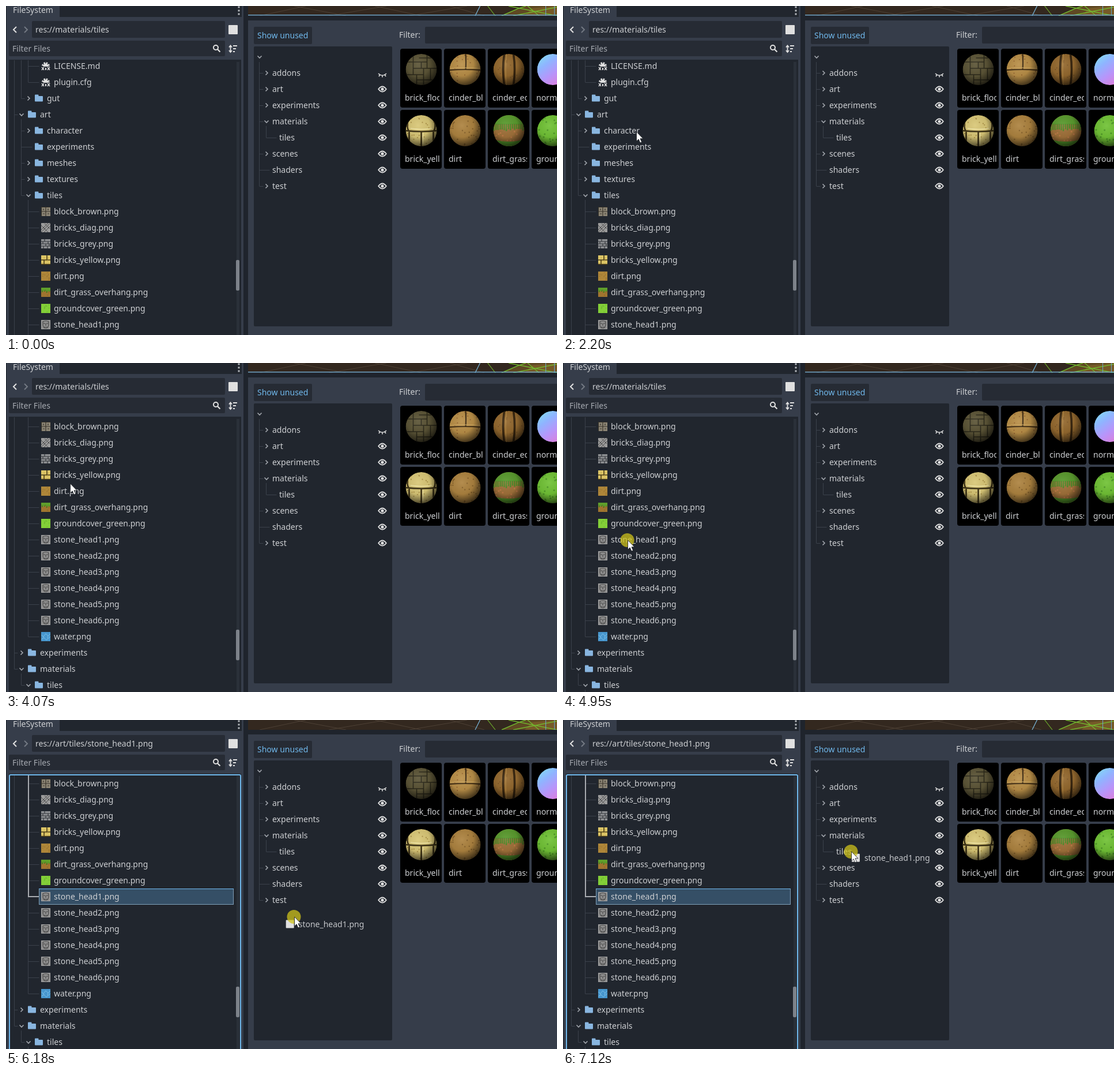
An HTML page for the animation above (8000 ms loop, 956x570 px).

```html
<!DOCTYPE html>
<html lang="en">
<head>
<meta charset="utf-8">
<title>File tree drag and drop</title>
<style>
  html, body { margin: 0; width: 100%; height: 100%; overflow: hidden; background: #363d4a; }
  svg { display: block; width: 100%; height: 100%; }
  text { font: 14px "Noto Sans", sans-serif; white-space: pre; }
</style>
</head>
<body>
<svg id="stage" viewBox="0 0 956 570"></svg>
<script>
const LOOP = 8000, ROW = 28;
const C = {
  base: '#363d4a', dark: '#21262e', gap: '#1f242c', field: '#262b34', text: '#cdcfd2',
  dim: '#a6aab1', accent: '#70b8ec', guide: '#3b414b', folder: '#89b6e0', icon: '#e0e0e0'
};

// ---------- drawing helpers ----------
const rect = (x, y, w, h, fill, more = '') =>
  `<rect x="${x}" y="${y}" width="${w}" height="${h}" fill="${fill}" ${more}/>`;
const line = (d, stroke, width = 1, more = '') =>
  `<path d="${d}" fill="none" stroke="${stroke}" stroke-width="${width}" ${more}/>`;
const shape = (d, fill) => `<path d="${d}" fill="${fill}"/>`;
const text = (x, mid, s, fill = C.text, more = '') =>
  `<text x="${x}" y="${mid + 5}" fill="${fill}" ${more}>${s}</text>`;
const at = (x, y, body, more = '') => `<g transform="translate(${x} ${y})" ${more}>${body}</g>`;

let seed = 7;
const rnd = () => (seed = (seed * 16807) % 2147483647) / 2147483647;
const specks = (n, span, r, fill) => Array.from({ length: n }, () =>
  `<circle cx="${((rnd() - .5) * span).toFixed(1)}" cy="${((rnd() - .5) * span).toFixed(1)}" r="${r}" fill="${fill}"/>`).join('');

const chevron = (x, y, open) => at(x, y,
  line(open ? 'M-3.5-1.5L0 2L3.5-1.5' : 'M-1.5-3.5L2 0L-1.5 3.5', '#a3a7ae', 1.6));
const folder = shape('M-7-5.5q0-1 1-1h4.5q1 0 1 1v1.5h6.5q1 0 1 1v7.5q0 1-1 1h-12q-1 0-1-1z', C.folder);
const gear =
  `<circle r="5.2" fill="none" stroke="${C.icon}" stroke-width="3.4" stroke-dasharray="2.5 1.58"/>` +
  `<circle r="4.4" fill="${C.icon}"/>` + rect(-8, 1, 16, 7, C.dark) +
  line('M-7 2l4 5M-3 2l-4 5M3 2l4 5M7 2l-4 5', C.icon, 1.5) + rect(-1, 3, 2, 4, C.icon);
const eye = y => at(653, y,
  line('M-6.8 0Q0-9 6.8 0Q0 9-6.8 0z', C.icon, 1.8) + `<circle r="2.6" fill="${C.icon}"/>`);
const shutEye = at(653, 118,
  line('M-7-1Q0 5.5 7-1M-4.5 1.5l-1.5 2.5M0 2.5v3M4.5 1.5l1.5 2.5', C.icon, 1.6));

// ---------- 16 px texture icons ----------
const tile = (fill, body = '') => rect(-8, -8, 16, 16, fill) + body;
const stoneHead = tile('#8d8d8d',
  line('M-5-5Q0-8 5-5V1Q4 6 0 7Q-4 6-5 1zM-4-2h3M1-2h3M0-2v4M-3 4q3 1.5 6 0', '#454545', 1.1) +
  line('M-7.5-7.5h15v15h-15z', '#a5a5a5', 1));
const tiles = {
  block_brown: tile('#8b8474', line('M-8 0H8M0-8V8M-8-7.5H8M-7.5-8V8M-4-5v3M4-5v3M-5 4h3M3 4h3', '#38332a', 1.2)),
  bricks_diag: tile('#9b9b9b', line('M-8 4L4-8M-8 8L8-8M-3 8L8-3M-8-4l12 12M-2-7l9 9', '#4a4a4a', 1)),
  bricks_grey: tile('#8d8f92', line('M-8-4H8M-8 0H8M-8 4H8M-2-8v4M4-4v4M-5-4v4M0 0v4M6 0v4M-4 4v4M3 4v4', '#35383c', 1.2)),
  bricks_yellow: tile('#dcc566', line('M-8 0H8M2-8V0M-3 0V8M-8 7.5H8', '#4a3c18', 1.6) + specks(8, 13, .6, '#a8893c')),
  dirt: tile('#ae8639', specks(10, 14, .7, '#8d672a')),
  dirt_grass_overhang: tile('#a0752f', rect(-8, -8, 16, 6, '#5f9f2b') +
    line('M-6-3v3M-2-3v2M2-3v4M6-3v2', '#4b8623', 2) + specks(6, 13, .6, '#6f4c1e')),
  groundcover_green: tile('#83cf38', specks(9, 14, .7, '#62ad2b')),
  water: tile('#4796cd', line('M-8-3l4 3 4-5 4 4 4-4M-8 5l5-3 4 4 7-6M-4 0l1 3M4-1l-1 4', '#79bce4', 1))
};
const iconFor = name => /\.(md|cfg)$/.test(name) ? gear
  : name.startsWith('stone') ? stoneHead
  : name.endsWith('.png') ? tiles[name.slice(0, -4)] : folder;

// ---------- file list: depth, fold state, name ----------
const files = [
  '3>tools', '3>util', '3 LICENSE.md', '3 plugin.cfg', '2>gut', '1vart', '2>character', '2 experiments',
  '2>meshes', '2>textures', '2vtiles', '3 block_brown.png', '3 bricks_diag.png', '3 bricks_grey.png',
  '3 bricks_yellow.png', '3 dirt.png', '3 dirt_grass_overhang.png', '3 groundcover_green.png',
  ...[1, 2, 3, 4, 5, 6].map(n => `3 stone_head${n}.png`),
  '3 water.png', '1>experiments', '1vmaterials', '2vtiles'
];
const fileRow = (s, i) => {
  const x = 12 * s[0], y = 48 + ROW * i, fold = s[1], name = s.slice(2);
  return line(`M${x + 2.5} ${y + .5}h${fold === ' ' ? 19 : 6}`, C.guide) +
    (fold === ' ' ? '' : chevron(x + 15, y, fold === 'v')) +
    at(x + 33, y, iconFor(name)) + text(x + 47, y, name);
};
const fileList =
  line('M14.5 0V776M26.5 0V160M26.5 196V328M26.5 784V804M38.5 0V132M38.5 336V720M38.5 812V840', C.guide) +
  `<g id="picked">${rect(57.5, 538.5, 337, 27, '#354f66', 'stroke="#7f9fb8"')}` +
  line('M57 538.5h338', '#70b8ec') + '</g>' +
  files.map(fileRow).join('') +
  `<g id="branch">${line('M39 336V552H57', '#a9acb1', 2)}</g>`;

const leftDock =
  rect(0, 0, 412, 570, C.base) + rect(0, 0, 1, 570, C.gap) + rect(93, 0, 316, 19, C.dark) +
  text(12, 7, 'FileSystem') +
  [2, 8, 14].map(y => rect(402.5, y - 1.5, 3, 3, '#b4b7bc')).join('') +
  line('M18 36l-5 5 5 5', C.icon, 2) + line('M32 36l5 5-5 5', '#737983', 2) +
  rect(45, 26, 335, 29, C.field, 'rx="2"') + text(51, 41, '', C.text, 'id="path"') +
  rect(386, 33, 16, 16, C.icon, 'rx="1"') +
  rect(5, 60, 375, 27, C.field, 'rx="2"') + text(11, 74, 'Filter Files', C.dim) +
  `<circle cx="364" cy="72" r="4" fill="none" stroke="${C.icon}" stroke-width="2"/>` +
  line('M367 75l4.5 4.5', C.icon, 2.2) +
  line('M389.5 69V79M387 71.5l2.5-3 2.5 3M387 77l2.5 3 2.5-3M394 69h7M394 74h5M394 79h3', C.icon, 1.8) +
  rect(5, 93, 403, 477, C.dark) + rect(400, 97, 5, 473, '#2a3039') +
  `<g clip-path="url(#listClip)"><g id="list">${fileList}</g></g>` +
  rect(399, 0, 6, 53, '#7d828a', 'rx="2" id="thumb"') +
  `<g id="focus">${rect(6, 95, 401, 500, 'none', `stroke="${C.accent}" stroke-width="2" rx="2"`)}</g>`;

// ---------- 3D view strip ----------
const view = `<g clip-path="url(#viewClip)">` + rect(420, 0, 536, 17, '#33281f') +
  line('M440 17L520 0M500 0L590 17M560 17L660 0M640 0L720 17M700 17L800 0M770 0L830 17', '#4d4035') +
  line('M823-1L814 17', '#79b6d8', 1.2) + line('M835-1L849 17', '#6aa52c', 1.2) +
  shape('M860 17L888 6L900 0H956V17z', '#5f4923') + shape('M900 17L912 4L956 0V17z', '#765a28') +
  line('M860 17L890 4L902 0M872 0L956 17M880 17L956 2M905 0L925 17', '#72b52e', 1.4) +
  line('M936.5 0V17M951.5 0V17', '#6aa6cc', 1) + '</g>' +
  rect(420, 15, 536, 1.4, '#6ba9d2', 'id="viewEdge"');

// ---------- folder tree ----------
const folders = ['>addons', '>art', '>experiments', 'vmaterials', '-tiles', '>scenes', ' shaders', '>test'];
const folderTree = rect(430, 70, 240, 485, C.dark, 'rx="2"') + chevron(440, 88, true) +
  line('M439.5 97V312M451.5 208V228', C.guide) +
  folders.map((s, i) => {
    const y = 116 + ROW * i, fold = s[0], x = fold === '-' ? 474 : 462;
    return line(`M${x - 22.5} ${y + .5}h${'>v'.includes(fold) ? 7 : 18}`, C.guide) +
      ('>v'.includes(fold) ? chevron(452, y, fold === 'v') : '') +
      text(x, y, s.slice(1)) + (i ? s === ' shaders' ? eye(y) : eye(y) : shutEye);
  }).join('');

// ---------- material cards ----------
const blades = Array.from({ length: 15 }, (_, i) => `M${-26 + i * 3.6}-12v${7 + 6 * rnd()}`).join('');
const balls = [
  ['brick_floor', '#5c5537', line('M-27-13H10M-14-2H27M-27 9H4M-8 18H27M-14-27V9M0-13V-2M10-27V-2M4-2V27M16-2V18M-8 9V27M-4-20H27', '#2b281a', 1.6)],
  ['cinder_block', '#b98f48', specks(26, 50, 1, '#93602f') + line('M-27 1Q0-1 27 1M1-27Q2-12 1 0', '#3f2c13', 2.2) + line('M-26-2Q0-4 26-2', '#d3ad64', 1.2)],
  ['cinder_edge', '#94692f', specks(24, 50, 1, '#7a5326') + line('M-8-27Q-12 0-8 27M8-27Q12 0 8 27', '#38260f', 3.6) + line('M-4-27Q-7 0-4 27', '#b08540', 1.3)],
  ['normal', 'url(#normal)', ''],
  ['brick_yellow', '#d9c777', specks(26, 48, 1.1, '#ad9247') + line('M-27 0Q0 3 27 0M0 1V27M-20-27Q-27-8-22 0M20-27Q27-8 22 0M-21 2V20M21 2V20', '#3d3215', 2.6) + line('M-19-4Q0-1 19-4M3 4V24', '#f1e5a2', 1.6)],
  ['dirt', '#ad8340', specks(30, 50, 1.2, '#87622b')],
  ['dirt_grass', '#a0713a', specks(22, 46, 1.4, '#c07a48') + rect(-27, -27, 54, 16, '#5a9a2e') + line(blades, '#4a8a26', 2.4) + shape('M-27 15Q0 23 27 15V27H-27z', '#559a2c')],
  ['ground', '#71c236', specks(28, 50, 1.5, '#4f9a28')]
];
const card = ([name, fill, detail], i) => {
  const body = rect(0, 0, 72, 102, '#000', 'rx="4"') +
    at(36.5, 36, `<circle r="27" fill="${fill}"/>${detail}` +
      (name === 'normal' ? '' : '<circle r="27.5" fill="url(#shade)"/>'), 'clip-path="url(#ball)"') +
    text(8, 85, name, C.text, 'clip-path="url(#label)"');
  return at(684 + 76 * (i % 4), i < 4 ? 74 : 180, body);
};

const rightDock = rect(412, 0, 544, 570, C.gap) + view + rect(420, 25, 536, 545, C.base) +
  rect(430, 36, 101, 30, C.field, 'rx="2"') + text(436, 51, 'Show unused', C.accent) + folderTree +
  text(682, 50, 'Filter:') + rect(727, 36, 240, 29, C.field, 'rx="2"') + balls.map(card).join('');

const clip = (id, x, y, w, h) => `<clipPath id="${id}">${rect(x, y, w, h, '#000')}</clipPath>`;
const defs = '<defs>' + clip('listClip', 5, 94, 395, 476) + clip('viewClip', 420, 0, 536, 17) +
  clip('label', 8, 70, 60, 30) + '<clipPath id="ball"><circle r="27"/></clipPath>' +
  `<radialGradient id="shade" cx=".4" cy=".34" r=".66">
    <stop offset="0" stop-color="#fff" stop-opacity=".08"/><stop offset=".55" stop-opacity=".06"/>
    <stop offset="1" stop-opacity=".62"/></radialGradient>
  <linearGradient id="normal" x1="0" y1="0" x2=".75" y2="1">
    <stop offset="0" stop-color="#7fe6f2"/><stop offset=".35" stop-color="#8fb4ff"/>
    <stop offset=".65" stop-color="#b795fa"/><stop offset="1" stop-color="#e07cd8"/></linearGradient></defs>`;

const overlay =
  `<g id="drag">${rect(1, 4, 14, 14, C.icon, 'rx="1"')}${text(23, 11, 'stone_head1.png', '#c3c5c9')}</g>` +
  `<circle id="press" r="12" cx="-.5" fill="#d0c41a" opacity=".74"/>` +
  `<path id="arrow" d="M.5 0V16.2L4.2 12.8L6.8 19L9.6 17.8L7 11.8H12z" fill="#fff" stroke="#15181d" stroke-width=".8"/>`;

const stage = document.getElementById('stage');
stage.innerHTML = defs + leftDock + rightDock + overlay;
const $ = id => document.getElementById(id);
const [path, list, thumb, focus, picked, branch, viewEdge, drag, press, arrow] =
  ['path', 'list', 'thumb', 'focus', 'picked', 'branch', 'viewEdge', 'drag', 'press', 'arrow'].map($);

// ---------- motion ----------
// Pointer moves: start, end, visible steps, points passed
const moves = [
  [340, 1140, 13, [[519, 508], [640, 420], [745, 260], [737, 140]]],
  [1210, 1660, 8, [[737, 140], [660, 112], [480, 122], [342, 170]]],
  [1860, 2200, 6, [[342, 170], [230, 182], [127, 218]]],
  [2400, 2670, 5, [[127, 218], [111, 208]]],
  [4070, 4690, 10, [[111, 208], [114, 224], [134, 262], [121, 298], [112, 307]]],
  [5240, 5980, 12, [[112, 307], [180, 400], [310, 496], [420, 440], [472, 340]]],
  [6060, 6390, 6, [[472, 340], [500, 341], [530, 310]]],
  [6530, 7120, 7, [[530, 310], [535, 282], [506, 238], [500, 228], [500, 228]]]
];
// Wheel notches: time, position
const wheel = [[0, 0], [2540, -1], [3150, 0], [3210, 1], [3400, 2], [3500, 3], [3600, 4]];
const PRESS = 4950, SELECT = 5100, DRAG = 5240, LAG = 60;

// Catmull-Rom curve through the points
function along(pts, u) {
  const n = pts.length - 1, i = Math.min(n - 1, Math.floor(u * n)), f = u * n - i;
  const q = [-1, 0, 1, 2].map(k => pts[Math.max(0, Math.min(n, i + k))]);
  return [0, 1].map(c => {
    const [a, b, d, e] = q.map(p => p[c]);
    return b + f / 2 * (d - a + f * (2 * a - 5 * b + 4 * d - e + f * (3 * (b - d) + e - a)));
  });
}
function pointer(t) {
  const [a, b, n, pts] = moves.filter(m => m[0] <= t).pop() || moves[0];
  const step = Math.floor((t - a) / (b - a) * (n - 1) + .25) + 1;
  const u = Math.max(0, Math.min(1, step / n));
  return along(pts, u * u * (3 - 2 * u));
}
const move = (node, x, y) => node.setAttribute('transform', `translate(${x.toFixed(1)} ${y.toFixed(1)})`);
const show = (node, on) => node.setAttribute('visibility', on ? 'visible' : 'hidden');

function draw(t) {
  const offset = Math.trunc(61.5 * wheel.filter(w => w[0] <= t).pop()[1]);
  move(list, 0, -offset);
  move(thumb, 0, 440 + offset * 22 / 246);

  const chosen = t >= SELECT;
  path.textContent = chosen ? 'res://art/tiles/stone_head1.png' : 'res://materials/tiles';
  [focus, picked, branch].forEach(node => show(node, chosen));
  show(viewEdge, !chosen);

  const tip = pointer(t);
  move(arrow, ...tip);
  move(press, ...tip);
  move(drag, ...pointer(t - LAG));
  show(arrow, t >= moves[0][0]);
  show(press, t >= PRESS);
  show(drag, t >= DRAG);
}

const start = performance.now();
function tick() {
  draw((performance.now() - start) % LOOP);
  requestAnimationFrame(tick);
}
tick();
</script>
</body>
</html>
```
